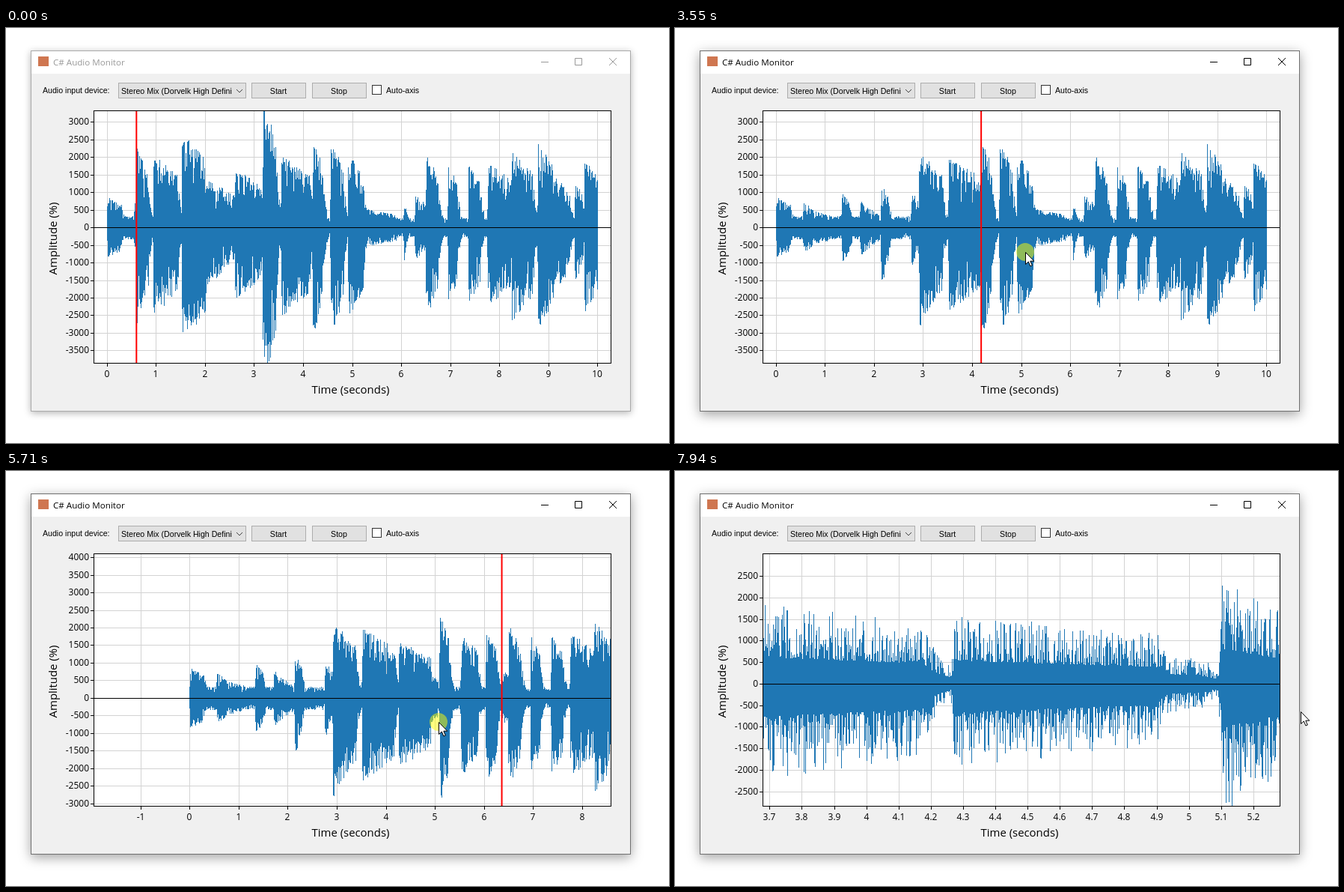
Recreate the animation shown at these times as an HTML page with a canvas. Size 886x554 px, loop 8 s.

```html
<!DOCTYPE html>
<html lang="en">
<head>
<meta charset="utf-8">
<title>Audio Monitor</title>
<style>
html, body { margin: 0; width: 100%; height: 100%; overflow: hidden; background: #fff; }
#stage { position: relative; width: 886px; height: 554px; overflow: hidden; }
#window {
  position: absolute; left: 33px; top: 30px; width: 800px; height: 480px;
  border: 1px solid #aaa; background: #f0f0f0; color: #999;
  box-shadow: 0 2px 9px rgba(0, 0, 0, .3);
}
#window.active { border-color: #707070; color: #000; box-shadow: 0 4px 15px rgba(0, 0, 0, .37); }
svg, canvas { position: absolute; left: 0; top: 0; }
.title { font: 11.6px "Open Sans", sans-serif; }
.form { font: 10.6px "Liberation Sans", Arial, sans-serif; }
.axis { font: 14.9px "Open Sans", sans-serif; text-anchor: middle; }
.mid { text-anchor: middle; }
.button { fill: #e1e1e1; stroke: #adadad; }
</style>
</head>
<body>
<div id="stage">
  <div id="window">
    <svg width="800" height="480" viewBox="34 31 800 480">
      <rect x="34" y="31" width="800" height="30" fill="#fff"/>
      <rect x="43" y="38" width="14" height="13" fill="#cf7650"/>
      <text class="title" x="63" y="50" fill="currentColor">C# Audio Monitor</text>
      <path d="M715 45.5h10M760.5 40.5h9v9h-9zM806 40l10 10M816 40l-10 10" fill="none" stroke="currentColor"/>
      <g class="button">
        <rect x="150.5" y="73.5" width="170" height="20"/>
        <rect x="328.5" y="73.5" width="72" height="20"/>
        <rect x="409.5" y="73.5" width="72" height="20"/>
      </g>
      <path d="M308 82l4 4 4-4" fill="none" stroke="#444"/>
      <rect x="489.5" y="76.5" width="12" height="12" fill="#fff" stroke="#333"/>
      <g class="form">
        <text x="49" y="87">Audio input device:</text>
        <text x="154" y="88">Stereo Mix (Dorvelk High Defini</text>
        <text class="mid" x="364" y="88">Start</text>
        <text class="mid" x="445" y="88">Stop</text>
        <text x="508" y="87">Auto-axis</text>
      </g>
      <text class="axis" x="460.5" y="488">Time (seconds)</text>
      <text class="axis" transform="translate(68 281) rotate(-90)">Amplitude (%)</text>
    </svg>
  </div>
  <canvas id="plot" width="886" height="554"></canvas>
</div>
<script>
const ctx = document.getElementById('plot').getContext('2d');
const win = document.getElementById('window');

const LOOP = 8000, STEP = 77.1, LAST_STEP = 103;
const GRAB = 3470, RELEASE = 6400, ZOOM = 6700;
const LEFT = 117, TOP = 110, RIGHT = 808, BOTTOM = 447;
const MID_X = 463, MID_Y = 279;
const X_SCALE = 65.56, Y_SCALE = 23.45 / 500;
const X_ZOOM = 6.575, Y_ZOOM = 1.226;
const CELLS = 430, SECONDS = 10;

// Notes of both recordings: start and end in seconds, peak in hundreds.
const freshNotes = [
  [0, .3, 8.5], [.55, .75, 7], [.8, 1.15, 4.5], [1.34, 1.5, 9.5], [1.72, 1.9, 7.5], [1.95, 2.1, 5],
  [2.14, 2.28, 12.5], [2.76, 2.9, 10.5], [2.92, 2.97, 25], [2.97, 3.38, 20], [3.52, 4.17, 19],
  [4.27, 4.9, 15.5], [4.9, 5.05, 7], [5.1, 5.27, 23.5], [5.53, 5.86, 18], [6.04, 6.25, 19]
];
const staleNotes = [
  [.6, .82, 22], [.95, 1.43, 20], [1.53, 2, 26], [2, 2.6, 13], [2.6, 3.14, 16], [3.18, 3.42, 35],
  [3.55, 4.13, 20], [4.19, 4.38, 25], [4.56, 4.8, 24], [4.92, 5.22, 20], [5.3, 5.9, 5],
  [6.05, 6.07, 10], [6.28, 6.48, 9], [6.5, 6.73, 20], [6.95, 7.13, 17], [7.37, 7.6, 17],
  [7.76, 8.25, 18], [8.25, 8.68, 21], [8.78, 9.1, 23], [9.1, 9.42, 14], [9.54, 9.68, 13], [9.73, 10, 19]
];

// Key points: time in ms, then x and y.
const pointerPath = [[300, 546, 496], [800, 497, 350], [2000, 497, 350], [2600, 503, 330], [GRAB, 468, 298]];
const originPath = [
  [3550, 135.3, 266.68], [4480, 84.8, 357.5], [5170, 320.3, 327.5], [6250, 169.3, 278.5],
  [RELEASE, 169.3, 283.35]
];
const grip = { x: 332.5, y: 32 };

const clamp01 = u => Math.min(1, Math.max(0, u));
const smooth = u => u * u * (3 - 2 * u);
const progress = (t, from, length) => smooth(clamp01((t - from) / length));

function along(path, t) {
  const next = Math.max(1, path.findIndex(key => key[0] > t));
  const b = t >= path.at(-1)[0] ? path.length - 1 : next;
  const [t0, x0, y0] = path[b - 1], [t1, x1, y1] = path[b];
  const u = progress(t, t0, t1 - t0);
  return { x: x0 + (x1 - x0) * u, y: y0 + (y1 - y0) * u };
}

function noise(k, seed) {
  const n = Math.sin(k * 12.9898 + seed * 78.233) * 43758.5453;
  return n - Math.floor(n);
}

// Quick attack, slow fade while the note is held, then a short ringing tail.
function noteLevel([start, end, peak], t) {
  if (t < start) return peak * Math.exp((t - start) / .008);
  const held = clamp01((t - start) / (end - start));
  return peak * (1 - .28 * held) * Math.exp(-Math.max(0, t - end) / .07);
}

function buildWave(notes, hush, seed) {
  return Array.from({ length: CELLS * SECONDS }, (_, k) => {
    const level = Math.max(hush, ...notes.map(note => noteLevel(note, k / CELLS)));
    const skew = level > 11 ? 1.22 : 1;
    return [1, skew].map((gain, side) =>
      100 * level * gain * (.35 + .7 * noise(k, seed + side) ** 2));
  });
}

const freshWave = buildWave(freshNotes, 3.2, 1);
const staleWave = buildWave(staleNotes, 2.6, 5);

function viewAt(t) {
  const { x, y } = along(originPath, t);
  const zx = X_ZOOM ** progress(t, ZOOM, 900);
  const zy = Y_ZOOM ** progress(t, ZOOM, 1240);
  return {
    x: MID_X + (x - MID_X) * zx, y: MID_Y + (y - MID_Y) * zy,
    sx: X_SCALE * zx, sy: Y_SCALE * zy
  };
}

function pointerAt(t) {
  if (t < GRAB) return along(pointerPath, t);
  const origin = along(originPath, t), pull = progress(t, ZOOM, 900);
  return { x: origin.x + grip.x + 334 * pull, y: origin.y + grip.y + 6 * pull };
}

function fill(color, x, y, w, h) {
  ctx.fillStyle = color;
  ctx.fillRect(x, y, w, h);
}

// Calls draw(value, pixel) for every tick between two pixels.
function eachTick(origin, scale, step, from, to, draw) {
  const first = Math.ceil((from - origin) / scale / step);
  for (let n = first; origin + n * step * scale <= to; n++) {
    draw(Number((n * step).toFixed(2)), Math.floor(origin + n * step * scale));
  }
}

function drawAxes(view) {
  ctx.font = '12px "Open Sans", sans-serif';
  const step = [0.1, 0.2, 0.5, 1].find(s => s * view.sx >= 40);
  ctx.textAlign = 'center';
  eachTick(view.x, view.sx, step, LEFT, RIGHT, (value, x) => {
    fill('#d3d3d3', x, TOP, 1, BOTTOM - TOP);
    fill('#000', x, BOTTOM, 1, 5);
    ctx.fillText(value, x, 466);
  });
  ctx.textAlign = 'right';
  eachTick(view.y, -view.sy, -500, TOP + 2, BOTTOM, (value, y) => {
    fill('#d3d3d3', LEFT, y, RIGHT - LEFT, 1);
    fill('#000', LEFT - 4, y, 4, 1);
    ctx.fillText(value || 0, 111, y + 4);
  });
}

function drawWave(view, head) {
  ctx.fillStyle = '#1f77b4';
  const cellAt = x => Math.floor((x - view.x) / view.sx * CELLS);
  for (let x = LEFT + 1; x < RIGHT; x++) {
    const first = cellAt(x), end = Math.max(first + 1, cellAt(x + 1));
    let up = 0, down = 0;
    for (let k = Math.max(0, first); k < end && k < staleWave.length; k++) {
      const [high, low] = (k / CELLS < head ? freshWave : staleWave)[k];
      up = Math.max(up, high);
      down = Math.max(down, low);
    }
    if (!up) continue;
    const top = Math.max(TOP, Math.round(view.y - up * view.sy));
    const bottom = Math.min(BOTTOM, Math.round(view.y + down * view.sy));
    ctx.fillRect(x, top, 1, bottom - top);
  }
}

const arrow = new Path2D('M.5 .5V16.5L4.3 13 6.9 19 9.3 18 6.8 12.2H11.8Z');

function drawPointer(t) {
  if (t < pointerPath[0][0]) return;
  const { x, y } = pointerAt(t);
  const pressed = (t >= GRAB && t < RELEASE) || (t >= ZOOM && t < 7850);
  ctx.save();
  ctx.translate(Math.round(x), Math.round(y));
  if (pressed) {
    ctx.fillStyle = 'rgba(255, 255, 0, .5)';
    ctx.beginPath();
    ctx.arc(0, 0, 12, 0, Math.PI * 2);
    ctx.fill();
  }
  ctx.fillStyle = '#fff';
  ctx.fill(arrow);
  ctx.stroke(arrow);
  ctx.restore();
}

function draw(t) {
  const view = viewAt(t), head = 0.595 + t * 0.00101;
  win.classList.toggle('active', t >= GRAB - 10);
  ctx.clearRect(0, 0, 886, 554);
  fill('#fff', LEFT, TOP, RIGHT - LEFT, BOTTOM - TOP);
  drawAxes(view);
  drawWave(view, head);
  fill('#000', LEFT, Math.floor(view.y), RIGHT - LEFT, 1);
  const headX = view.x + head * view.sx;
  if (headX > LEFT && headX < RIGHT) fill('#f00', headX - 1, TOP + 1, 2, BOTTOM - TOP);
  ctx.strokeStyle = '#000';
  ctx.strokeRect(LEFT + .5, TOP + .5, RIGHT - LEFT, BOTTOM - TOP);
  drawPointer(t);
}

const start = performance.now();
function tick() {
  const elapsed = (performance.now() - start) % LOOP;
  draw(Math.min(LAST_STEP, Math.floor((elapsed + 8) / STEP)) * STEP);
  requestAnimationFrame(tick);
}
tick();
</script>
</body>
</html>
```
